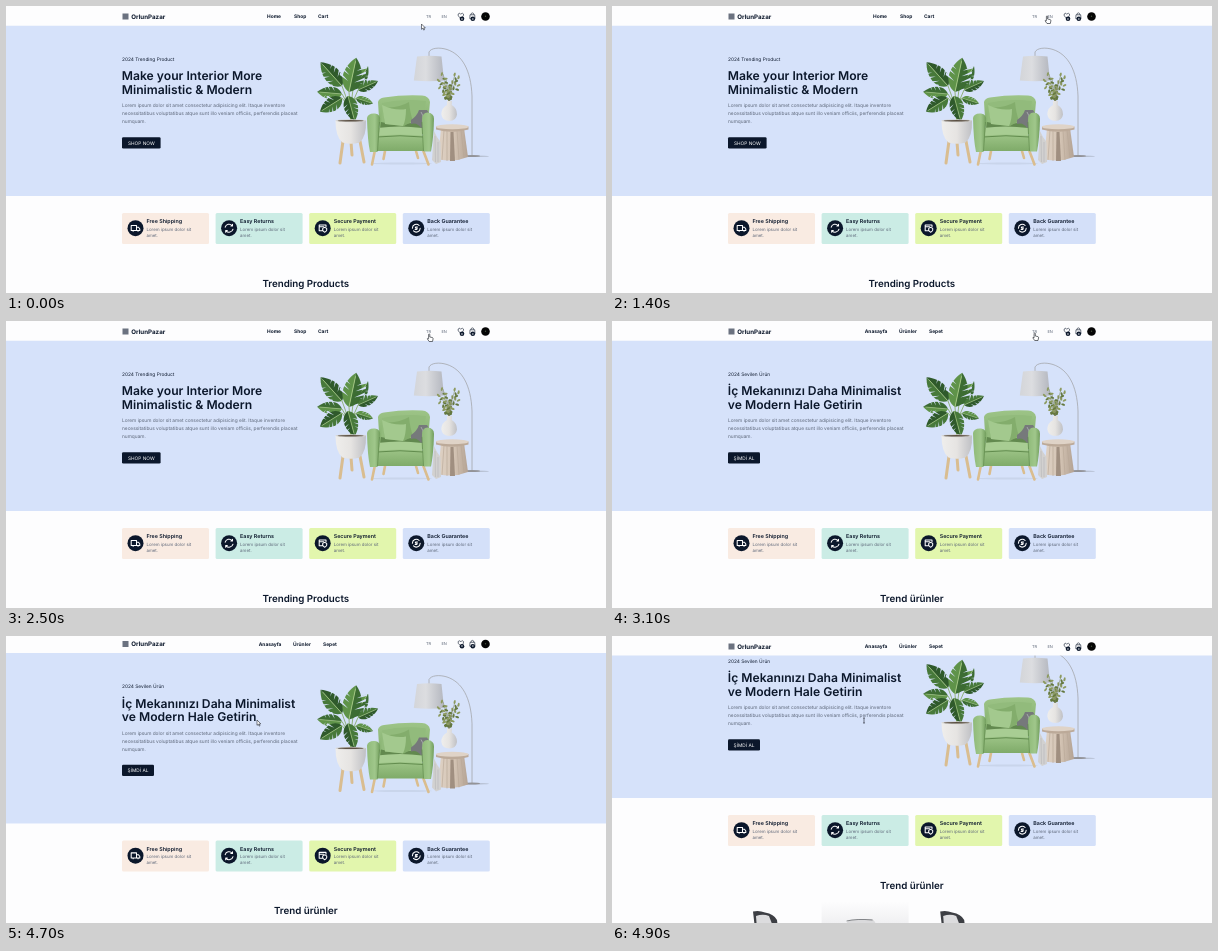
These frames come from a looping animation (600x287 px, 5 s). An HTML page:

```html
<!DOCTYPE html>
<html lang="en">
<head>
<meta charset="utf-8">
<title>Furniture shop</title>
<style>
  html, body { margin: 0; width: 100%; height: 100%; overflow: hidden; background: #fdfdfe; }
  svg { display: block; width: 100%; height: 100%; }
  text { font-family: Inter, "Open Sans", sans-serif; fill: #0b172b; text-rendering: geometricPrecision; }
  .line { fill: none; stroke: #fff; stroke-width: 1.05; stroke-linecap: round; stroke-linejoin: round; }
  .grey { fill: #5c6678; }
  .white { fill: #fff; }
</style>
</head>
<body>
<svg id="stage" viewBox="0 0 600 287">
  <defs>
    <linearGradient id="shade">
      <stop offset="0" stop-color="#d3d5d9"/><stop offset=".4" stop-color="#dcdde0"/><stop offset="1" stop-color="#b4b7bf"/>
    </linearGradient>
    <linearGradient id="pot">
      <stop offset="0" stop-color="#efeeec"/><stop offset=".5" stop-color="#e6e4e2"/><stop offset="1" stop-color="#bfc0c4"/>
    </linearGradient>
    <linearGradient id="fabric" x2="0" y2="1">
      <stop offset="0" stop-color="#9dc487"/><stop offset="1" stop-color="#7fab69"/>
    </linearGradient>
    <linearGradient id="arm">
      <stop offset="0" stop-color="#8fba79"/><stop offset=".6" stop-color="#a0c78b"/><stop offset="1" stop-color="#719d5c"/>
    </linearGradient>
    <linearGradient id="wood">
      <stop offset="0" stop-color="#dfd2c5"/><stop offset=".55" stop-color="#d3c3b3"/><stop offset="1" stop-color="#b3a293"/>
    </linearGradient>
    <linearGradient id="photo" x2="0" y2="1">
      <stop offset="0" stop-color="#fdfdfe"/><stop offset="1" stop-color="#ededef"/>
    </linearGradient>
  </defs>

  <g id="page">
    <rect y="19.500" width="600" height="170.500" fill="#d6e2fa"/>

    <g id="room">
      <!-- floor lamp -->
      <ellipse cx="467" cy="150.300" rx="16" ry=".7" fill="#b3bccd"/>
      <ellipse cx="466" cy="150" rx="8" ry="1" fill="#939397"/>
      <path d="M423 51V46C425 42 433 41 441 43.500C456 48.500 465 64 466 90V150" fill="none" stroke="#9a9a9a" stroke-width=".65"/>
      <path d="M411 50.500Q423 49 435.500 50.500L438 74.500Q423 76 407.800 74.500Z" fill="url(#shade)"/>

      <!-- plant -->
      <path d="M337 135L334 157M354 135L358 156M345 136L346 149" stroke="#d9bd90" stroke-width="3" stroke-linecap="round"/>
      <g id="plant"></g>
      <path d="M329.500 114.500H360Q360.500 131 353.500 136.500Q345 139 336.500 136.500Q329.500 131 329.500 114.500Z" fill="url(#pot)"/>
      <ellipse cx="344.700" cy="114.700" rx="15.200" ry="1.500" fill="#d3d2cf"/>
      <ellipse cx="344.700" cy="114.800" rx="13" ry=".8" fill="#5b4f42"/>

      <!-- side table -->
      <path d="M435 122H458L462 151Q447 157 432 153Z" fill="url(#wood)"/>
      <path d="M444.500 126H447.500L449 155H444Z" fill="#a08f80"/>
      <path d="M438 124L436 154M441 124V155M451 124L453 154M455 124L458 152" stroke="#b8a696" stroke-width=".6"/>
      <path d="M430 120.500H462.500V123.500Q446 128 430 123.500Z" fill="#bcaa99"/>
      <ellipse cx="446.200" cy="120.800" rx="16.300" ry="2.500" fill="#dfd3c7"/>
      <g id="sprig"></g>
      <path d="M441 95H446L445.700 99Q451 102 451 108.500Q450 115 443.500 115Q436 115 435.300 108Q435.500 102 441 99Z" fill="url(#pot)"/>

      <!-- armchair -->
      <ellipse cx="396" cy="157.500" rx="30" ry="1" fill="#c9d5eb"/>
      <path d="M369 144L366 158.500M379 145L377.500 153M417 144L422.500 158.500M410 145L412 152" stroke="#dabd8e" stroke-width="2.600" stroke-linecap="round"/>
      <path d="M372 96Q373 92 378 91.500Q397 88.500 416 89.500Q423 90 424 96L421 128H374Z" fill="url(#fabric)"/>
      <path d="M376 97Q397 92 420 95L416 123H375Z" fill="#92bb7c"/>
      <path d="M375 116Q394 121 416 115V124H374Z" fill="#62894f"/>
      <path d="M377 101Q391 103 403 96Q404 107 407 115L398 120L379 118Z" fill="#83ad6c"/>
      <path d="M376 99Q389 105 400 103Q400 114 397 120L379 118Z" fill="#a3c98e"/>
      <path d="M405 114Q411 110 413 104L421 104Q425 108 423 121L415 122Q411 116 405 118Z" fill="#76797b"/>
      <path d="M415 106Q419 112 417 121" fill="none" stroke="#a5a8aa" stroke-width="1"/>
      <path d="M371 122Q394 119 416 122V131H371Z" fill="#a8cd93"/>
      <path d="M367 130Q394 127 421 130V145H367Z" fill="url(#fabric)"/>
      <path d="M371 131Q394 128.500 417 131" fill="none" stroke="#628c4e" stroke-width="1"/>
      <path d="M361 112Q362 107 369 107.500Q375 108 374 115L371.500 146H364Q361.500 134 361 112Z" fill="url(#arm)"/>
      <path d="M416 114Q416 106.500 421.500 106.500Q428 107 428 113Q427.500 133 425 145.500H417.500Z" fill="url(#arm)"/>
      <path d="M373.500 116L371.500 145M415.800 116L417.500 145" stroke="#628c4e" stroke-width=".7"/>
      <path d="M428 125Q431 132 434.500 136L435 156L430 158L426 154Z" fill="#d2d1d0"/>
      <path d="M429 130L429.500 156M432 136V156" stroke="#b8b8b9" stroke-width=".6"/>
    </g>

    <g id="cards"></g>

    <!-- first row of products -->
    <g id="goods"></g>
  </g>

  <g id="header">
    <rect y="-10" width="600" height="29.500" fill="#fdfdfe"/>
    <rect x="116.500" y="7.500" width="6" height="6" fill="#6b7280"/>
    <g fill="none" stroke="#0b172b" stroke-width=".6">
      <path d="M454.700 12.500L452.300 9.900Q451.500 7.500 453.300 7.300Q454.300 7.300 454.800 8.300Q455.400 7.200 456.500 7.300Q458.200 7.600 457.300 9.900Z"/>
      <path d="M464 8.800H468.700L469 12.700H463.800ZM464.900 8.800Q465 6.900 466.400 6.900T467.900 8.800"/>
    </g>
    <circle cx="456" cy="12.800" r="2.300" fill="#0b172b"/>
    <circle cx="466.800" cy="12.800" r="2.300" fill="#0b172b"/>
    <circle cx="479.500" cy="10.500" r="4.300" fill="#050505"/>
    <circle cx="479.500" cy="10.200" r=".7" fill="#46523f"/>
  </g>

  <g id="cursor">
    <path id="arrow" d="M0 0V5.300L1.300 4.200L2.200 6.100L3 5.700L2.200 3.900H3.800Z" fill="#fff" stroke="#20242c" stroke-width=".6"/>
    <path id="hand" d="M-.6 .3Q0 -.4 .6 .3V3L3.300 3.600Q4 3.900 3.900 4.800L3.300 7.500H0L-1.900 4.900Q-2 4 -.6 4.700Z" fill="#fff" stroke="#20242c" stroke-width=".65"/>
    <path id="beam" d="M-1 -2.500H1M0 -2.500V2.500M-1 2.500H1" fill="none" stroke="#20242c" stroke-width=".6"/>
  </g>
</svg>

<script>
const NS = "http://www.w3.org/2000/svg";
const $ = id => document.getElementById(id);
const LOOP = 5000, STEP = 100, SWITCH = 2700;

function add(parent, tag, attrs, content) {
  const el = document.createElementNS(NS, tag);
  for (const key in attrs) el.setAttribute(key, attrs[key]);
  if (content) el.textContent = content;
  parent.append(el);
  return el;
}

function label(parent, x, y, size, content, weight = 400, more = {}) {
  return add(parent, "text", { x, y, "font-size": size, "font-weight": weight, ...more }, content);
}

function random(seed) {
  return () => (seed = seed * 16807 % 2147483647) / 2147483647;
}

// Broad leaf that points up before rotation, one half darker, with slits at the rim.
function leaf(x, y, angle, size, wide, [light, dark]) {
  const g = add($("plant"), "g", { transform: `translate(${x} ${y}) rotate(${angle}) scale(${size})` });
  const half = side => `M0 0C${side * wide} -.15 ${side * wide} -.65 0 -1Z`;
  add(g, "path", { d: half(-1), fill: light });
  add(g, "path", { d: half(1), fill: dark });
  for (const side of [-1, 1]) {
    for (const at of [.3, .48, .64]) {
      add(g, "path", { d: `M${side * wide * .25} ${-at}L${side * wide} ${-at - .2}V${-at - .12}Z`, fill: "#d6e2fa" });
    }
  }
  add(g, "path", { d: "M0 0V-.9", stroke: "#a5c882", "stroke-width": .025 });
}

function drawPlants() {
  const plant = $("plant"), greens = [["#5f9349", "#3c6c33"], ["#47793a", "#2f5a2b"]];
  const leaves = [
    [347, 83, 34, 27, .34], [336, 80, -42, 32, .34], [343, 86, 12, 35, .36],
    [352, 84, 66, 22, .3], [336, 88, -85, 25, .34], [336, 92, -122, 26, .36],
    [350, 92, 108, 18, .3], [342, 90, 165, 26, .36]
  ];
  for (const [x, y] of leaves) {
    add(plant, "path", { d: `M345 115Q344 100 ${x} ${y}`, fill: "none", stroke: "#7fa55c", "stroke-width": .8 });
  }
  leaves.forEach((spot, i) => leaf(...spot, greens[i % 2]));

  const rnd = random(17), sprig = $("sprig");
  for (let i = 0; i < 7; i++) {
    const x = 434 + i * 3, top = 80 - 12 * Math.sin((i + 1) * .75) ** 2;
    add(sprig, "path", { d: `M443 98Q443 88 ${x} ${top}`, fill: "none", stroke: "#78805a", "stroke-width": .5 });
    for (let k = 0; k < 6; k++) {
      const f = k / 6, px = x + (443 - x) * f * f + rnd() * 3 - 1.5, py = top + (96 - top) * f;
      add(sprig, "ellipse", {
        rx: 2, ry: 1, fill: k % 2 ? "#64783f" : "#8c9a5e",
        transform: `translate(${px} ${py}) rotate(${rnd() * 180})`
      });
    }
  }
}

function drawCards() {
  const icons = [
    "M-4.300 -2.800H1V2.300H-4.300ZM1 -1H3L4.300 .8V2.300H1M-2.400 3.100h.1M2.500 3.100h.1",
    "M-3.900 -1A4 4 0 0 1 3 -2.600M3.400 -4V-2.300H1.800M3.900 1A4 4 0 0 1 -3 2.600M-3.400 4V2.300H-1.800",
    "M-.5 2.500H-3.500V-3.300H3.300V-1.500M-3.500 -1.500H1M2 -.8L4 .2V2Q3.700 3.300 2 4Q.3 3.300 0 2V.2Z",
    "M-3.900 0A3.900 3.900 0 0 1 2.800 -2.700M3.900 0A3.900 3.900 0 0 1 -2.800 2.700M1.200 -1.200H-.5Q-1.400 -.6 -.5 0H.5Q1.400 .6 .5 1.200H-1.200"
  ];
  const items = [
    ["Free Shipping", "#f9ebe2"], ["Easy Returns", "#cbece5"],
    ["Secure Payment", "#e2f6ad"], ["Back Guarantee", "#d4e0f9"]
  ];
  items.forEach(([title, fill], i) => {
    const g = add($("cards"), "g", { transform: `translate(${116 + i * 93.6} 207)` });
    add(g, "rect", { width: 87, height: 31, rx: 1.5, fill });
    add(g, "circle", { cx: 13.5, cy: 15.2, r: 8, fill: "#0b172b" });
    add(g, "path", { d: icons[i], class: "line", transform: "translate(13.5 15.2)" });
    label(g, 24.5, 10.4, 5.35, title, 600);
    label(g, 24.5, 17.6, 4.4, "Lorem ipsum dolor sit", 400, { class: "grey" });
    label(g, 24.5, 23.6, 4.4, "amet.", 400, { class: "grey" });
  });
}

function drawGoods() {
  for (let i = 0; i < 3; i++) {
    const g = add($("goods"), "g", { transform: `translate(${116 + i * 93.6} 293)` });
    if (i === 1) {
      add(g, "rect", { width: 87, height: 28, fill: "url(#photo)" });
      add(g, "path", { d: "M23 28Q24 19 31 19L50 18Q55 20 55 28Z", fill: "#dadadc" });
      add(g, "path", { d: "M25 20Q35 17.500 51 19", fill: "none", stroke: "#6a6c70", "stroke-width": .8 });
    } else {
      add(g, "path", { d: "M25 10.500Q31 9 37 11.500Q46 13 49 19L50 28H27Z", fill: "#3d3f44" });
      add(g, "path", { d: "M28 15Q35 12.500 41 15L46 28H29Z", fill: "#dcdcde" });
    }
  }
}

const copy = {
  en: {
    nav: [["Home", 261], ["Shop", 288], ["Cart", 312]],
    tag: "2024 Trending Product",
    head: ["Make your Interior More", "Minimalistic & Modern"],
    button: ["SHOP NOW", 38.6],
    title: "Trending Products"
  },
  tr: {
    nav: [["Anasayfa", 252.7], ["Ürünler", 287], ["Sepet", 317]],
    tag: "2024 Sevilen Ürün",
    head: ["İç Mekanınızı Daha Minimalist", "ve Modern Hale Getirin"],
    button: ["ŞİMDİ AL", 32],
    title: "Trend ürünler"
  }
};

function drawCopy(lang) {
  const { nav, tag, head, button, title } = copy[lang];
  const page = add($("page"), "g", {}), menu = add($("header"), "g", {});
  for (const [word, x] of nav) label(menu, x, 12.2, 4.9, word, 700);
  label(page, 116, 54.8, 4.8, tag);
  head.forEach((line, i) => label(page, 115.8, 74.2 + i * 13.7, 12.15, line, 600));
  add(page, "rect", { x: 116, y: 131.2, width: button[1], height: 11.3, rx: 1.3, fill: "#0b172b" });
  label(page, 116 + button[1] / 2, 138.5, 4.8, button[0], 400, { "text-anchor": "middle", class: "white" });
  label(page, 299.8, 280.5, 9.75, title, 600, { "text-anchor": "middle" });
  return [page, menu];
}

function drawShared() {
  const grey = { class: "grey" }, header = $("header");
  [
    "Lorem ipsum dolor sit amet consectetur adipisicing elit. Itaque inventore",
    "necessitatibus voluptatibus atque sunt illo veniam officiis, perferendis placeat",
    "numquam."
  ].forEach((line, i) => label($("page"), 116, 101.4 + i * 7.85, 4.8, line, 400, grey));
  label(header, 125.3, 12.7, 6.2, "OrlunPazar", 700);
  label(header, 420, 12, 4, "TR", 400, grey);
  label(header, 435.4, 12, 4, "EN", 400, grey);
  for (const x of [456, 466.8]) label(header, x, 13.8, 2.8, "0", 600, { "text-anchor": "middle", class: "white" });
}

drawPlants();
drawCards();
drawGoods();
drawShared();
const layers = { en: drawCopy("en"), tr: drawCopy("tr") };

// Pointer stops: time, x, y
const route = [
  [0, 415.5, 18], [500, 421, 12], [800, 424, 11], [1300, 435, 10], [1900, 435, 10],
  [2400, 423.2, 13], [2600, 423.2, 13], [3000, 422.7, 12], [4000, 422.7, 12],
  [4300, 264.5, 29], [4700, 251, 84], [4900, 252, 84.5]
];

function pointerAt(t) {
  const next = route.findIndex(stop => stop[0] > t);
  if (next < 0) return route[route.length - 1].slice(1);
  const [t0, x0, y0] = route[next - 1], [t1, x1, y1] = route[next];
  const u = (t - t0) / (t1 - t0), k = u * u * (3 - 2 * u);
  return [x0 + (x1 - x0) * k, y0 + (y1 - y0) * k];
}

const scrollAt = t => t < 4600 ? 0 : 28 * ((t - 4500) / 400) ** 3.48;
const show = (el, on) => el.setAttribute("display", on ? "inline" : "none");

function render(t) {
  const scroll = scrollAt(t), [x, y] = pointerAt(t), lang = t < SWITCH ? "en" : "tr";
  $("page").setAttribute("transform", `translate(0 ${-scroll})`);
  $("header").setAttribute("transform", `translate(0 ${scroll < 8 ? -scroll : 0})`);
  for (const key in layers) layers[key].forEach(el => show(el, key === lang));

  const onLink = y < 15 && (Math.abs(x - 423) < 5 || Math.abs(x - 438) < 5);
  const onText = scroll > 20;
  $("cursor").setAttribute("transform", `translate(${x} ${y})`);
  show($("hand"), onLink);
  show($("beam"), onText);
  show($("arrow"), !onLink && !onText);
}

function tick() {
  render(Math.floor(performance.now() % LOOP / STEP) * STEP);
  requestAnimationFrame(tick);
}
tick();
</script>
</body>
</html>
```
